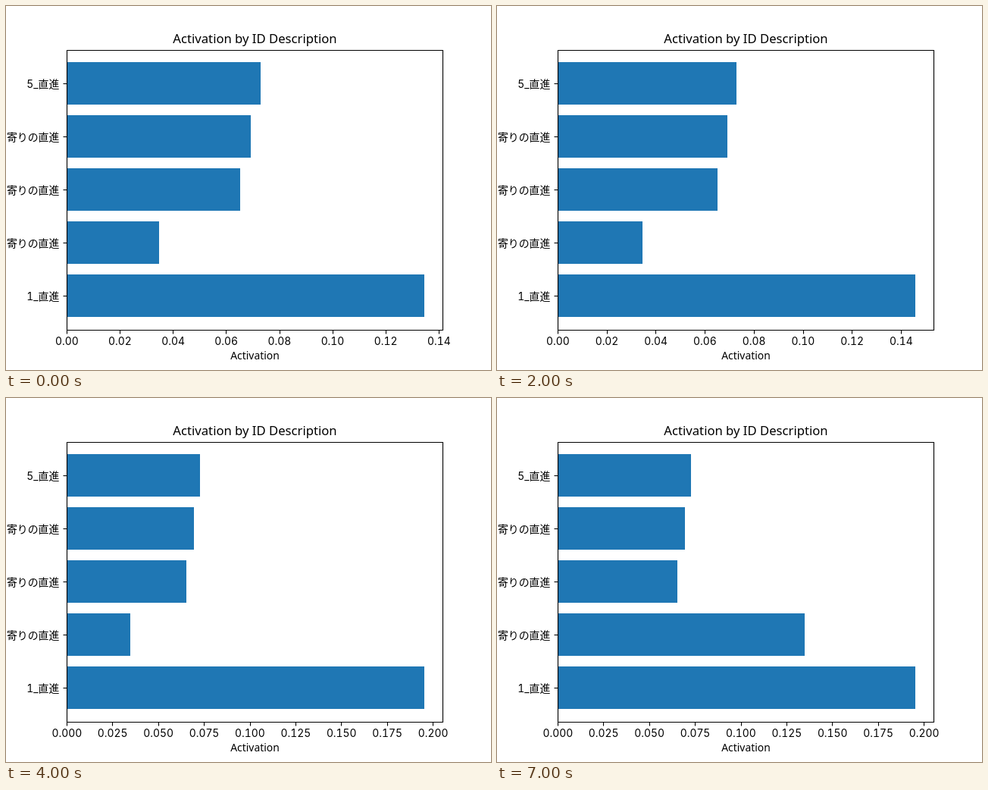
Write an HTML page that moves like this. It is 640 px wide and 480 px high and loops after 8 s.

```html
<!DOCTYPE html>
<html lang="ja">
<head>
<meta charset="utf-8">
<title>Activation by ID Description</title>
<style>
  html, body { margin: 0; width: 100%; height: 100%; overflow: hidden; background: #fff; }
  svg { display: block; }
  text { font: 13.89px "Noto Sans", "Noto Sans CJK JP", sans-serif; fill: #000; }
  .num { font-family: Inter, "Noto Sans CJK JP", "Noto Sans CJK", sans-serif; font-feature-settings: "tnum"; }
  .title { font-size: 16.67px; }
  .mid { text-anchor: middle; }
  .end { text-anchor: end; }
  .bar { fill: #1f77b4; shape-rendering: crispEdges; }
  .line { fill: none; stroke: #000; stroke-width: 1.11; }
</style>
</head>
<body>
<svg width="640" height="480" viewBox="0 0 640 480">
  <g id="bars"></g>
  <g id="axes"></g>
  <g id="ticks"></g>
</svg>
<script>
const LOOP = 8000;
const LEFT = 80, WIDTH = 496, BOTTOM = 427.5;
const LABELS = ["5_直進", "寄りの直進", "寄りの直進", "寄りの直進", "1_直進"];
const UPPER = [0.073, 0.06935, 0.0653];

// Start time, activation of the fourth row, activation of the last row, tick step
const STEPS = [
  [0,    0.03468, 0.1347, 0.02],
  [1000, 0.03468, 0.1383, 0.02],
  [2000, 0.03468, 0.146,  0.02],
  [3000, 0.03468, 0.1572, 0.02],
  [4000, 0.03468, 0.1955, 0.025],
  [5000, 0.1313,  0.1955, 0.025],
  [7000, 0.135,   0.1955, 0.025]
];

const byId = id => document.getElementById(id);
const bars = byId("bars"), axes = byId("axes"), ticks = byId("ticks");

function add(parent, tag, attrs, text) {
  const el = document.createElementNS("http://www.w3.org/2000/svg", tag);
  for (const key in attrs) el.setAttribute(key, attrs[key]);
  if (text) el.textContent = text;
  parent.appendChild(el);
  return el;
}

const line = (parent, d) => add(parent, "path", { class: "line", d });
const label = (parent, x, y, cls, text) => add(parent, "text", { x, y, class: cls }, text);

const rects = LABELS.map((name, i) => {
  const y = 74 + 70 * i;
  line(axes, `M75.5 ${y + 28.5}H80.5`);
  label(axes, 70.3, y + 34, "num end", name);
  return add(bars, "rect", { class: "bar", x: LEFT, y, height: 56 });
});
line(axes, `M80.5 58.5H576.5V${BOTTOM}H80.5Z`);
label(axes, 328.5, 49, "title mid", "Activation by ID Description");
label(axes, 328.5, 465.5, "mid", "Activation");

function draw([, fourth, last, step]) {
  const limit = last * 1.05, scale = WIDTH / limit;
  [...UPPER, fourth, last].forEach((v, i) =>
    rects[i].setAttribute("width", Math.round(v * scale)));

  ticks.replaceChildren();
  const digits = step === 0.025 ? 3 : 2;
  for (let i = 0; i * step < limit; i++) {
    const x = LEFT + i * step * scale;
    line(ticks, `M${Math.round(x) + 0.5} ${BOTTOM}V432.5`);
    label(ticks, x + 0.3, 447, "num mid", (i * step).toFixed(digits));
  }
}

let shown = null;
function tick() {
  const t = performance.now() % LOOP;
  const current = STEPS.findLast(s => s[0] <= t);
  if (current !== shown) draw(shown = current);
  requestAnimationFrame(tick);
}
tick();
</script>
</body>
</html>
```
